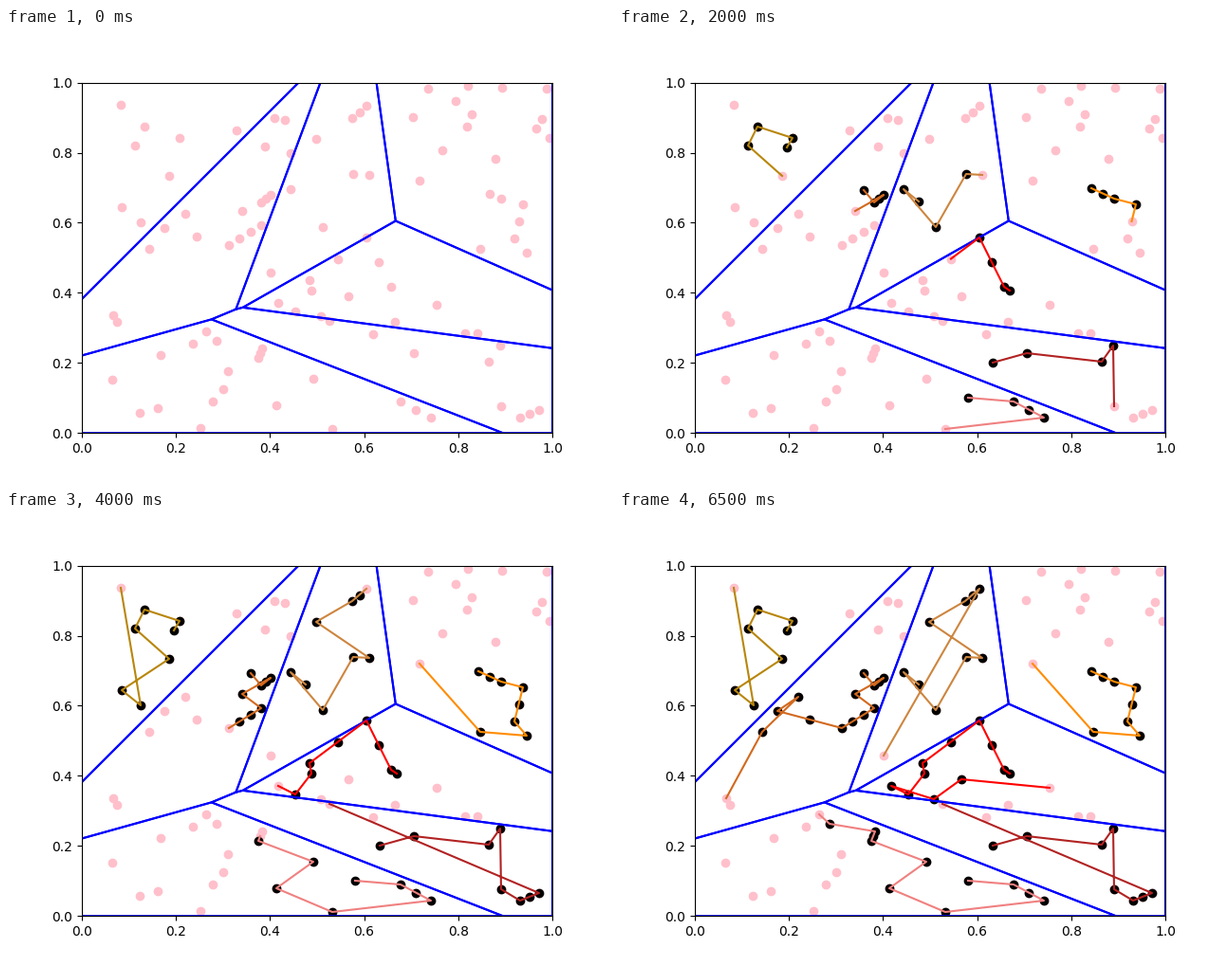
These frames come from a looping animation (640x480 px, 7500 ms). A matplotlib script:

```python
import numpy as np
import matplotlib.pyplot as plt
from matplotlib.animation import FuncAnimation

STEPS = 15
STEP_MS = 500
_ = None  # a stop placed evenly between its neighbours

# One walk per cell, in stage pixels; the first stop is the cell's seed.
WALKS = {
    "darkgoldenrod": [(177, 126), (183, 116), (146, 104), (136, 124),
                      (172, 156), (122, 189), (142, 205), (121, 81)],
    "chocolate": [(258, 171), (269, 184), _, (279, 176), (249, 193),
                  (269, 208), _, _, (235, 229), _, (167, 211), (189, 196),
                  (151, 233), (113, 303)],
    "peru": [(316, 183), (300, 170), (334, 210), (366, 154), (383, 155),
             (327, 117), (365, 95), _, (380, 82), (279, 258)],
    "darkorange": [(498, 169), _, (522, 180), (545, 186), _, (536, 222),
                   (549, 237), (500, 233), (436, 161)],
    "red": [(412, 277), (406, 273), _, (380, 221), _, (320, 266), (322, 277),
            (305, 299), (287, 290), (332, 304), (361, 283), (454, 292)],
    "firebrick": [(394, 353), (430, 343), (509, 352), (521, 335), (522, 399),
                  (542, 411), _, (562, 403), (341, 309)],
    "lightcoral": [(368, 390), (416, 394), _, (448, 411), (344, 423),
                   (285, 398), (324, 370), (266, 348), _, (270, 338),
                   (222, 330), (211, 320)],
}

# Areas the walks leave untouched: count, lower left corner, upper right corner
PATCHES = [
    (5, (0.14, 0.78), (0.45, 1)),
    (13, (0.64, 0.75), (1, 1)),
    (10, (0, 0), (0.34, 0.33)),
    (4, (0.48, 0.26), (0.85, 0.32)),
]


def walk_points(stops):
    """Fill in the open stops and convert pixels to unit coordinates."""
    known = [i for i, s in enumerate(stops) if s]
    xs, ys = zip(*(stops[i] for i in known))
    steps = range(len(stops))
    x, y = np.interp(steps, known, xs), np.interp(steps, known, ys)
    return np.column_stack(((x - 80) / 496, (427.2 - y) / 369.6))


def voronoi_cell(seed, others):
    """Clip the unit square by the bisector to every other seed."""
    poly = [np.array(c, float) for c in ((0, 0), (1, 0), (1, 1), (0, 1))]
    for other in others:
        normal, middle = other - seed, (other + seed) / 2
        clipped = []
        for a, b in zip(poly, poly[1:] + poly[:1]):
            da, db = (a - middle) @ normal, (b - middle) @ normal
            if da <= 0:
                clipped.append(a)
            if da * db < 0:
                clipped.append(a + (b - a) * da / (da - db))
        poly = clipped
    return np.array(poly + poly[:1])


walks = [walk_points(stops) for stops in WALKS.values()]
seeds = [walk[0] for walk in walks]
rng = np.random.default_rng(4)
loose = [rng.uniform(low, high, (n, 2)) for n, low, high in PATCHES]

fig, ax = plt.subplots(figsize=(6.4, 4.8), dpi=100)
ax.set_xlim(0, 1)
ax.set_ylim(0, 1)

ax.scatter(*np.vstack(loose + [walk[1:] for walk in walks]).T, color="pink")
visited = ax.scatter([], [], color="black")

for i, seed in enumerate(seeds):
    ax.plot(*voronoi_cell(seed, seeds[:i] + seeds[i + 1:]).T, color="blue")

trails = [ax.plot([], [], color=color)[0] for color in WALKS]


def update(step):
    done = []
    for walk, trail in zip(walks, trails):
        n = min(step, len(walk) - 1)
        trail.set_data(*walk[:n + 1 if n else 0].T)
        done.append(walk[:n])
    visited.set_offsets(np.vstack(done))
    return [visited, *trails]


anim = FuncAnimation(fig, update, frames=STEPS, interval=STEP_MS,
                     repeat=True, repeat_delay=0)
plt.show()
```
